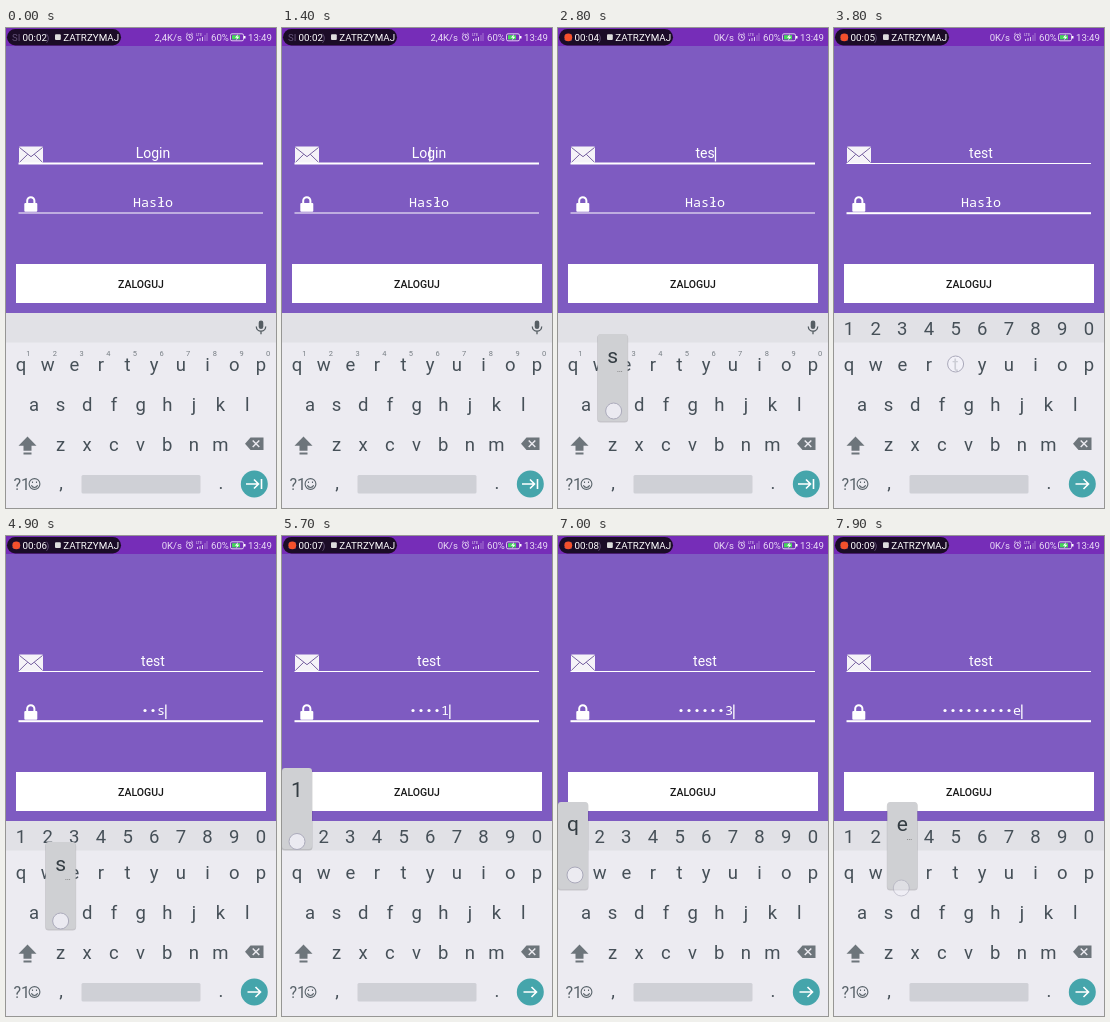
An HTML page that plays this animation: 270 by 480 pixels, repeating every 8 s.

```html
<!DOCTYPE html>
<html lang="pl">
<head>
<meta charset="utf-8">
<title>Logowanie</title>
<style>
  html, body { margin: 0; width: 100%; height: 100%; overflow: hidden; background: #7e5bc1; }
  svg { display: block; width: 100vw; height: 100vh; }
  text { font-family: Roboto, sans-serif; }
  .mid { text-anchor: middle; }
  .mono { font-family: "Noto Sans Mono", monospace; font-size: 13.4px; }
  .status { font-size: 9.6px; fill: #e9dcf5; }
  .field { fill: #fff; font-size: 14px; text-anchor: middle; }
  .key { font-size: 18.5px; fill: #465058; text-anchor: middle; }
  .hint { font-size: 7.5px; fill: #777e84; text-anchor: middle; }
</style>
</head>
<body>
<svg viewBox="0 0 270 480" preserveAspectRatio="none">
  <rect width="270" height="480" fill="#7e5bc1"/>
  <rect width="270" height="18" fill="#762db8"/>

  <!-- status bar -->
  <rect x="1" y="1" width="114" height="16.5" rx="8.2" fill="#1b0c27"/>
  <text class="status" x="6" y="12.5" style="fill:#65547a">SI</text>
  <text class="status" x="40" y="12.5" style="fill:#65547a">)</text>
  <circle id="rec" cx="10.3" cy="9.3" r="3.9" fill="#f4502c"/>
  <text id="timer" x="16.5" y="12.7" font-size="9.8" fill="#fff"></text>
  <rect x="49" y="6.3" width="5.8" height="5.8" rx="1" fill="#ddd"/>
  <text x="57.3" y="12.7" font-size="9.8" fill="#fff">ZATRZYMAJ</text>
  <text id="speed" class="status" x="176" y="12.7" text-anchor="end"></text>
  <g fill="none" stroke="#e9dcf5" stroke-width=".9">
    <circle cx="183.5" cy="9.5" r="3.1"/>
    <path d="M183.5 7.5v2.2h1.6M180 6.6l1.7-1.6M187 6.6l-1.7-1.6"/>
    <path d="M191.5 13v-2M194 13v-3M196.5 13v-4"/>
    <path d="M199 13V7M201 13V5" opacity=".45"/>
    <rect x="224.5" y="5.8" width="13" height="7" rx="1.5"/>
  </g>
  <text x="190" y="7.5" font-size="4" fill="#e9dcf5">LTE</text>
  <text class="status" x="205" y="12.7">60%</text>
  <rect x="226" y="7.2" width="8" height="4.2" fill="#45d65a"/>
  <path d="M238 8h1.5v2.6H238zM232 6l-3 3.7h2l-1 2.8 3.3-3.8h-2z" fill="#fff"/>
  <text class="status" x="242" y="12.7">13:49</text>

  <!-- login form -->
  <rect x="13" y="118.5" width="24" height="16.5" rx="1" fill="#f5f3f8"/>
  <path d="M13.5 119.5 25 128.7 36.5 119.5M13.5 134.3l8.2-8M36.5 134.3l-8.2-8" fill="none" stroke="#7560a0" stroke-width="1"/>
  <path d="M21.2 176v-3.2a3.6 3.6 0 0 1 7.2 0v3.2" fill="none" stroke="#fff" stroke-width="2"/>
  <rect x="18.3" y="175" width="13" height="8.8" rx="1" fill="#fff"/>
  <rect id="loginLine" x="12.5" width="244.5" fill="#fff"/>
  <rect id="passLine" x="12.5" width="244.5" fill="#fff"/>
  <text id="login" class="field" x="147" y="130"></text>
  <g id="password"></g>
  <rect id="cursor" width="1.3" height="14.5" fill="#fff"/>
  <rect x="10" y="236" width="250" height="39" fill="#fff"/>
  <text class="mid" x="135" y="259.7" font-size="10.5" font-weight="500" fill="#171717">ZALOGUJ</text>

  <!-- keyboard -->
  <rect y="285" width="270" height="195" fill="#ecebf1"/>
  <rect y="285" width="270" height="29.5" fill="#e1e1e6"/>
  <g id="keys"></g>
  <g id="hints">
    <rect x="252.7" y="292.5" width="4.6" height="8.6" rx="2.3" fill="#555d63"/>
    <path d="M250.3 298.5a4.7 4.7 0 0 0 9.4 0M255 303.3v3" fill="none" stroke="#555d63" stroke-width="1.3"/>
  </g>
  <g id="digits"></g>
  <path d="M21.5 408.5l9 9.3h-5v5h-8v-5h-5zM17.5 424.5h8v2h-8z" fill="#6d757b"/>
  <path d="M244.5 409.5H257.5V422H244.5L239 415.7z" fill="#6d757b"/>
  <path d="M246.7 412.4l6.6 6.6M253.3 412.4l-6.6 6.6" stroke="#ecebf1" stroke-width="1.4"/>
  <text x="7.5" y="461.7" font-size="16" fill="#59636a">?1</text>
  <g fill="none" stroke="#59636a" stroke-width="1.1">
    <circle cx="28.5" cy="456" r="5.4"/>
    <path d="M25.4 457.3a3.3 3.3 0 0 0 6.2 0M26.5 453.6v1.5M30.5 453.6v1.5"/>
  </g>
  <text class="key" x="55" y="461">,</text>
  <text class="key" x="215" y="461">.</text>
  <rect x="75.5" y="447" width="119" height="18.5" rx="1.5" fill="#cfd0d6"/>
  <circle cx="248.3" cy="456" r="13.5" fill="#45a5ab"/>
  <path id="nextArrow" fill="none" stroke="#fff" stroke-width="1.6" d="M240 456h12.5M248 451.5l4.5 4.5-4.5 4.5M255.5 451v10"/>
  <path id="doneArrow" fill="none" stroke="#fff" stroke-width="1.6" d="M241.5 456h13M249.5 451l5 5-5 5"/>

  <!-- key preview and finger -->
  <g id="preview">
    <rect id="previewShade" width="31" rx="3.5" fill="#000" opacity=".16"/>
    <rect id="previewBox" width="30" rx="3" fill="#cfd0d3"/>
    <text id="previewKey" class="mid" font-size="21" fill="#343d43"></text>
    <text id="previewMore" class="mid" font-size="9" fill="#777">…</text>
  </g>
  <circle id="touch" r="8" fill="#f3f2fa" fill-opacity=".78" stroke="#aaa9ba" stroke-width="1"/>
</svg>
<script>
  const LOOP = 8000, FOCUS_PASSWORD = 3600, CENTER = 147, CELL = 8;
  const $ = id => document.getElementById(id);
  const set = (node, attrs) => {
    for (const name in attrs) node.setAttribute(name, attrs[name]);
    return node;
  };
  const show = (id, on) => { $(id).style.display = on ? '' : 'none'; };
  const add = (parent, tag, attrs, text = '') => {
    const node = set(document.createElementNS('http://www.w3.org/2000/svg', tag), attrs);
    node.textContent = text;
    return parent.appendChild(node);
  };

  // Lay out the rows and remember where each key is
  const PITCH = 26.65, places = {};
  const row = (chars, left, y, parent) => [...chars].forEach((char, i) => {
    const x = left + i * PITCH;
    places[char] = { x, y };
    add(parent, 'text', { class: 'key', x, y: y + 6 }, char);
  });
  row('1234567890', 15, 300.5, $('digits'));
  row('qwertyuiop', 15, 337, $('keys'));
  row('asdfghjkl', 28, 377, $('keys'));
  row('zxcvbnm', 54.5, 417, $('keys'));
  [...'1234567890'].forEach((char, i) =>
    add($('hints'), 'text', { class: 'hint', x: 22.3 + i * PITCH, y: 327.5 }, char));

  // key, finger down, finger up, finger offset from the key centre
  const presses = [
    ['t', 1500, 1700, 1, 2], ['e', 2000, 2200, 4, 3], ['s', 2600, 2800, 1, 6], ['t', 2900, 3050, 0, 2],
    ['next', 3200, 3400, 9, -4],
    ['t', 3800, 4000, 0, -1], ['e', 4200, 4400, 2, 4], ['s', 4600, 4900, 0, 8], ['t', 5100, 5300, 0, 2],
    ['1', 5500, 5700, 0, 5], ['2', 6000, 6200, 1, 4], ['3', 6400, 6600, 1, 4],
    ['q', 6900, 7100, 2, 2], ['w', 7300, 7500, 1, 4], ['e', 7650, 7850, -1, 15]
  ].map(([key, down, up, dx, dy]) => ({ key, down, up, dx, dy }));
  places.next = { x: 248, y: 456 };

  function drawStatus(t) {
    const phase = (t + 350) % 1000;
    show('rec', t < 1650 ? t >= 400 && t < 900 : phase < 550);
    $('timer').textContent = '00:0' + (t < 1650 ? 2 : 3 + Math.floor((t - 1650) / 1000));
    $('speed').textContent = t < 2650 ? '2,4K/s' : '0K/s';
  }

  function drawFields(t) {
    const inPassword = t >= FOCUS_PASSWORD;
    const typed = presses.filter(p => p.key !== 'next' && p.up <= t);
    const word = typed.map(p => p.key).join('');
    const login = word.slice(0, 4), secret = word.slice(4);

    $('login').textContent = login || 'Login';
    set($('loginLine'), { y: inPassword ? 135 : 134.5, height: inPassword ? 1 : 2 });
    set($('passLine'), { y: inPassword ? 184.2 : 184.5, height: inPassword ? 2 : 1 });

    const box = $('password');
    box.replaceChildren();
    const left = CENTER - secret.length * CELL / 2;
    if (!secret) add(box, 'text', { class: 'mono mid', x: CENTER, y: 179, fill: '#fff' }, 'Hasło');
    [...secret].forEach((char, i) => {
      const x = left + (i + .5) * CELL;
      if (i < secret.length - 1) add(box, 'circle', { cx: x, cy: 174.5, r: 1.6, fill: '#fff' });
      else add(box, 'text', { class: 'mono mid', x, y: 179, fill: '#fff' }, char);
    });

    const lastEdit = typed.length ? typed[typed.length - 1].up : 400;
    const lit = t >= lastEdit && (t - lastEdit) % 1000 < 500;
    show('cursor', lit && (!inPassword || secret));
    const half = inPassword ? secret.length * CELL / 2
      : login ? $('login').getComputedTextLength() / 2 : 0;
    set($('cursor'), { x: CENTER + half + .2, y: inPassword ? 168.5 : 119 });
  }

  function drawKeyboard(t) {
    const inPassword = t >= FOCUS_PASSWORD;
    show('hints', !inPassword);
    show('digits', inPassword);
    show('nextArrow', !inPassword);
    show('doneArrow', inPassword);

    const popped = presses.find(p => p.key !== 'next' && t >= p.down + 100 && t < p.up + 100);
    show('preview', popped);
    if (popped) {
      const { x, y } = places[popped.key];
      const isDigit = popped.key <= '9';
      const top = isDigit ? y - 68.5 : y - 71;
      const height = isDigit ? 81 : 87;
      set($('previewShade'), { x: x - 15.5, y: top + .5, height: height + 1 });
      set($('previewBox'), { x: x - 15, y: top, height });
      set($('previewKey'), { x, y: top + 29 });
      $('previewKey').textContent = popped.key;
      set($('previewMore'), { x: x + 7, y: top + 38 });
      show('previewMore', 'es'.includes(popped.key));
    }

    const finger = presses.find(p => t >= p.down && t < p.up + 120);
    show('touch', finger);
    if (finger) {
      const { x, y } = places[finger.key];
      set($('touch'), {
        cx: x + finger.dx, cy: y + finger.dy,
        opacity: 1 - Math.max(0, t - finger.up) / 120
      });
    }
  }

  const start = performance.now();
  function frame() {
    const t = (performance.now() - start) % LOOP;
    drawStatus(t);
    drawFields(t);
    drawKeyboard(t);
    requestAnimationFrame(frame);
  }
  frame();
</script>
</body>
</html>
```
